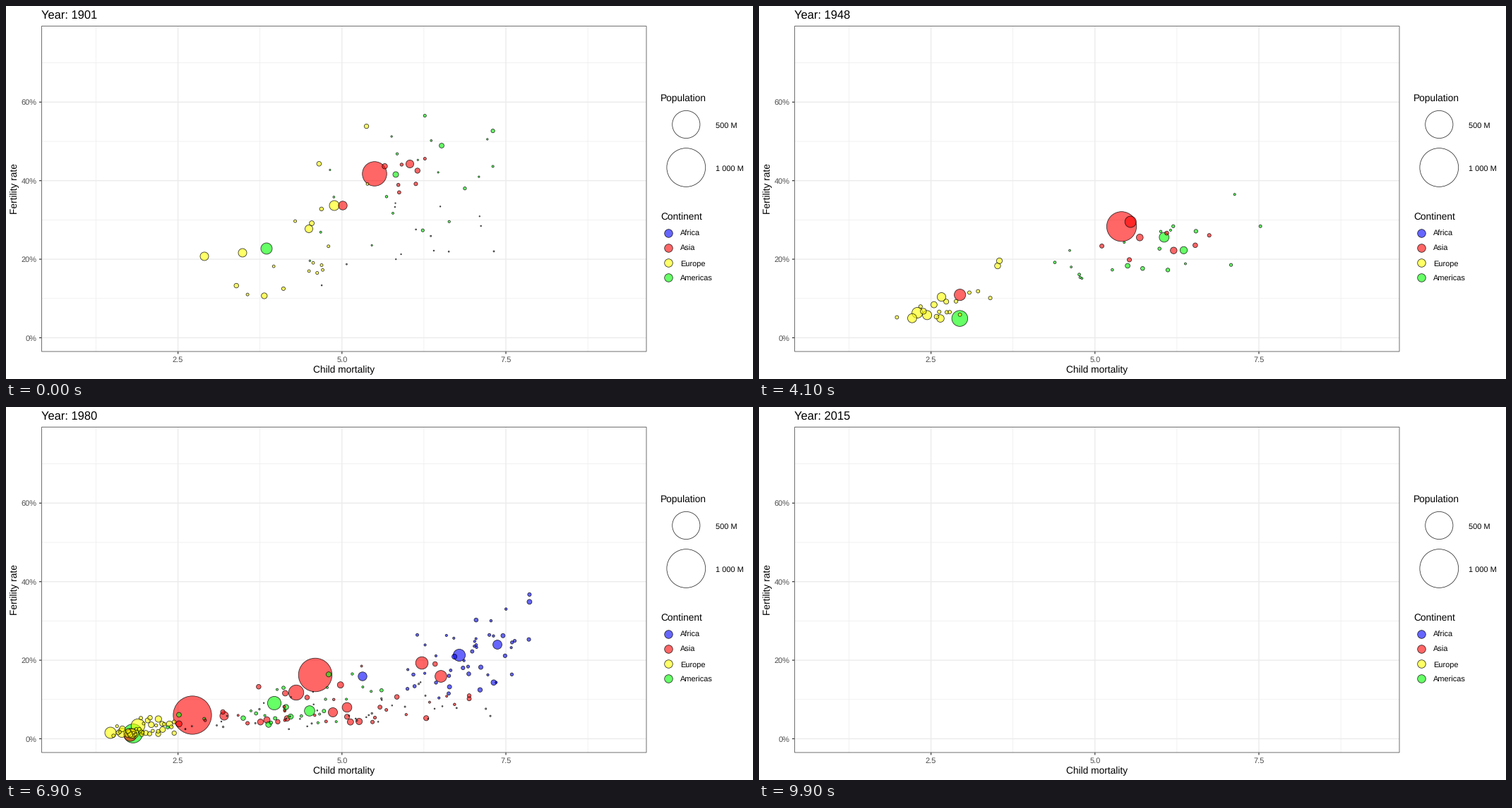
These frames come from a looping animation (1058x529 px, 10000 ms). A matplotlib script:

```python
import numpy as np
import matplotlib.pyplot as plt
from matplotlib.animation import FuncAnimation
from matplotlib.patches import Rectangle

W, H, DPI = 1058, 529, 100
PT = 72 / DPI                        # points per pixel
FRAMES = 100
LEFT, RIGHT, TOP, BOTTOM = 50.5, 907, 28.5, 490
BASE = 470.5                         # pixel row of 0 %
POSES = (0, 17, 32, 49, 69, 80, 98)  # frames of the key poses
EARLY, LATE = (0, 17, 32, 42.9), POSES[3:]
JOIN = 43                            # frame at which most countries appear
FILL = {"af": (0, 0, 1, .6), "as": (1, 0, 0, .6), "eu": (1, 1, 0, .6),
        "am": (0, 1, 0, .6), "na": (.5, .5, .5, .6)}
EDGE = (0, 0, 0, .8)

plt.rcParams.update({"font.family": "Liberation Sans", "text.hinting": "none",
                     "path.snap": False})
rng = np.random.default_rng(12)
tracks = []


def hero(kind, radii, xs, ys):
    """Large bubble through the last len(xs) poses, radii spread evenly in time."""
    t = POSES[-len(xs):]
    start = 0 if t[0] == 0 else JOIN
    tracks.append((kind, start, t[-1], t, xs, ys, np.linspace(start, t[-1], len(radii)), radii))


def cloud(kind, n, radii, t, cx, sx, height, sh, link, span=None):
    """Seeded swarm: centres, spreads and heights at times t; link ties height to x."""
    start, stop = span or (0 if t is EARLY else JOIN, t[-1])
    for _ in range(n):
        a, b = rng.normal(size=2)
        r = radii[0] + (radii[1] - radii[0]) * rng.random() ** 2
        xs, ys = [], []
        for c, s, h in zip(cx, sx, height):
            a, b = np.clip((a, b), -1.8, 1.8)
            u = link * a + np.sqrt(1 - link ** 2) * b
            xs.append(max(c + s * a, 95))
            ys.append(BASE - h * np.exp(sh * u))
            a, b = .87 * np.array((a, b)) + .5 * rng.normal(size=2)
        tracks.append((kind, start, stop, t, xs, ys, (start, stop), (r, r * 1.3)))


# bubbles present from the start
hero("as", (17.3, 19.3, 22, 28.3, 32),
     (522, 522, 504, 522, 264, 198, 158), (238, 248, 281, 341, 437, 442, 464))
hero("as", (6.2, 8.5, 10),
     (477, 496, 372, 207, 176, 148, 141), (283, 311, 371, 444, 465, 467, 469))
hero("as", (5.6, 8.5, 14),
     (572, 520, 513, 538, 411, 275, 242), (224, 235, 269, 339, 405, 430, 455))
hero("am", (8, 15.8),
     (369, 320, 206, 354, 180, 199, 187), (344, 391, 432, 453, 463, 465, 467))
hero("am", (4, 7.5, 12.6),
     (552, 559, 559, 587, 380, 251, 181), (239, 249, 283, 368, 420, 441, 462))
hero("am", (3.4, 5.5, 10),
     (617, 564, 556, 642, 430, 301, 222), (198, 249, 304, 384, 431, 448, 463))
hero("eu", (6, 7.2),
     (281, 253, 209, 264, 181, 172, 197), (355, 385, 423, 452, 463, 466, 468))
hero("eu", (6, 7.1),
     (335, 261, 182, 248, 178, 177, 190), (350, 407, 429, 455, 463, 466, 468))
hero("eu", (7, 8.4),
     (465, 241, 220, 228, 148, 133, 142), (283, 352, 425, 444, 462, 465, 468))
hero("eu", (5.5, 7),
     (429, 343, 295, 226, 164, 128, 145), (316, 348, 383, 439, 462, 465, 468))

# large bubbles that join at mid-century
hero("as", (17.3, 31), (559, 438, 348, 237), (328, 380, 406, 444))
hero("as", (6, 12), (625, 589, 535, 355), (315, 363, 398, 424))
hero("as", (6, 11), (629, 616, 386, 218), (315, 382, 400, 449))
hero("as", (5, 8.9), (588, 483, 393, 287), (404, 426, 443, 455))
hero("as", (4.8, 8.5), (685, 463, 297, 193), (407, 433, 446, 458))
hero("as", (4.8, 7.5), (599, 309, 193, 146), (397, 438, 453, 463))
hero("eu", (9, 10.6), (262, 187, 138, 169), (434, 452, 457, 465))
hero("af", (5.5, 12), (602, 642, 601, 540), (279, 352, 353, 408))
hero("af", (4.5, 8.6), (630, 696, 670, 432), (287, 337, 365, 437))
hero("af", (4.3, 8.4), (652, 505, 372, 330), (301, 382, 430, 457))

# smaller bubbles of the first decades
cloud("eu", 17, (1.9, 4.2), EARLY, (410, 360, 275, 260), (62, 75, 70, 40),
      (125, 112, 62, 40), .45, .8)
cloud("am", 20, (1.1, 2.7), EARLY, (560, 555, 535, 540), (72, 68, 95, 95),
      (205, 190, 140, 110), .25, .6)
cloud("as", 7, (2, 4), EARLY, (570, 560, 580, 590), (35, 35, 55, 60),
      (235, 228, 165, 130), .1, .4)
cloud("na", 14, (.7, 1), EARLY, (565, 560, 540, 500), (70, 75, 75, 75),
      (125, 112, 95, 80), .35, .4, (0, 26))
cloud("af", 6, (1, 2.8), EARLY, (640, 645, 640, 640), (30, 28, 30, 30),
      (245, 240, 230, 230), .1, .2, (10, 25))

# smaller bubbles from mid-century on
cloud("af", 46, (1.4, 3.4), LATE, (645, 655, 585, 430), (48, 48, 62, 78),
      (158, 112, 84, 36), .33, .45)
cloud("as", 36, (1.3, 4), LATE, (600, 440, 340, 235), (78, 120, 110, 50),
      (82, 42, 27, 12), .5, .55)
cloud("eu", 36, (1.8, 4.2), LATE, (255, 195, 165, 158), (33, 24, 25, 18),
      (28, 13, 9, 3.5), .5, .35)
cloud("am", 28, (1.3, 3.6), LATE, (615, 400, 310, 215), (65, 95, 88, 38),
      (98, 40, 24, 10), .45, .55)
cloud("na", 40, (.7, 1.1), LATE, (600, 470, 385, 270), (95, 120, 110, 65),
      (98, 34, 24, 13), .5, .55)

fig = plt.figure(figsize=(W / DPI, H / DPI), dpi=DPI, facecolor="white")
ax = fig.add_axes([0, 0, 1, 1])
ax.set(xlim=(0, W), ylim=(H, 0))
ax.axis("off")


def label(x, y, s, px, color="black", **kw):
    kw.setdefault("va", "baseline")
    return ax.text(x, y, s, fontsize=px * PT, color=color, **kw)


def line(xs, ys, color, px, z):
    ax.plot(xs, ys, color=color, lw=px * PT, zorder=z, solid_capstyle="butt", snap=False)


def dots(xs, ys, rs, colors):
    return ax.scatter(xs, ys, s=(2 * np.asarray(rs) * PT) ** 2, c=colors,
                      edgecolors=[EDGE], linewidths=.8 * PT, zorder=3)


for i in range(8):
    width = 1.33 if i % 2 else .67
    gx = 127.5 + 116.1 * i
    gy = BASE - 55.7 * i
    if i < 7:
        line([gx, gx], [TOP, BOTTOM], "#ebebeb", width, 1)
    line([LEFT, RIGHT], [gy, gy], "#ebebeb", .67 if i % 2 else 1.33, 1)
    if i in (1, 3, 5):
        line([gx, gx], [BOTTOM, BOTTOM + 3.5], "#333333", 1.2, 4)
        label(gx, 504.5, f"{1.25 * (i + 1):.1f}", 11, "#4d4d4d", ha="center")
    if i % 2 == 0:
        line([LEFT - 3.5, LEFT], [gy, gy], "#333333", 1.2, 4)
        label(43.7, gy + 4, f"{10 * i}%", 11, "#4d4d4d", ha="right")
ax.add_patch(Rectangle((LEFT, TOP), RIGHT - LEFT, BOTTOM - TOP, fill=False,
                       ec="#707070", lw=PT, zorder=5, snap=False))

title = label(50, 18.5, "", 16.5)
label(478.8, 520, "Child mortality", 13.75, ha="center")
label(12, 259.5, "Fertility rate", 13.75, ha="center", va="center", rotation=90)

label(927, 135.3, "Population", 13.75)
dots([963.3, 963.3], [168, 229], [19.6, 27.4], "none")
label(1005.3, 172.5, "500 M", 11)
label(1005.3, 233.5, "1 000 M", 11)
label(927, 303.3, "Continent", 13.75)
for k, (kind, name) in enumerate(zip(FILL, ("Africa", "Asia", "Europe", "Americas"))):
    y = 322 + 21.1 * k
    dots([938], [y], [5.8], [FILL[kind]])
    label(955, y + 4.2, name, 11)

bubbles = dots([], [], [], None)
bubbles.set_clip_path(Rectangle((LEFT, TOP), RIGHT - LEFT, BOTTOM - TOP,
                                transform=ax.transData))


def draw(i):
    title.set_text(f"Year: {round(1901 + i * 114 / 99)}")
    rows = [(np.interp(i, rt, r), np.interp(i, t, x), np.interp(i, t, y), kind)
            for kind, start, stop, t, x, y, rt, r in tracks if start <= i <= stop]
    rows.sort(key=lambda b: -b[0])
    bubbles.set_offsets(np.array([b[1:3] for b in rows]).reshape(-1, 2))
    bubbles.set_sizes([(2 * b[0] * PT) ** 2 for b in rows])
    bubbles.set_facecolors([FILL[b[3]] for b in rows])
    return bubbles, title


anim = FuncAnimation(fig, draw, frames=FRAMES, interval=100, repeat=True,
                     repeat_delay=0, init_func=lambda: draw(0), blit=False)
plt.show()
```
